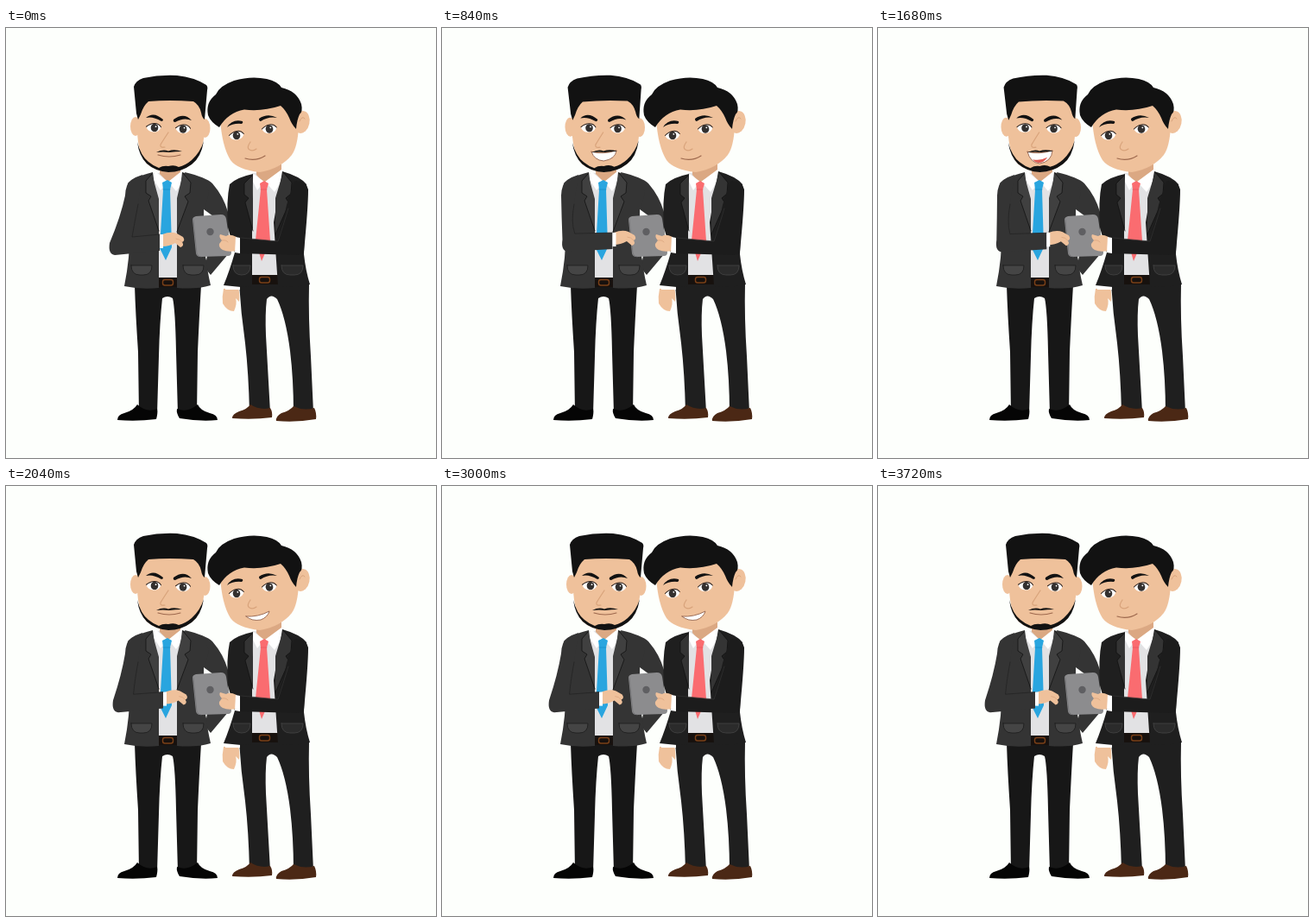
Animation of 498 by 498 pixels, one loop 3.84 s. Source, as an HTML page with a canvas:

```html
<!DOCTYPE html>
<html lang="en">
<head>
<meta charset="utf-8">
<title>Two colleagues with a tablet</title>
<style>
  html, body { margin: 0; width: 100%; height: 100%; overflow: hidden; background: #fdfffc; }
  canvas { display: block; width: 498px; height: 498px; }
</style>
</head>
<body>
<canvas id="stage" width="498" height="498"></canvas>
<script>
const ctx = document.getElementById('stage').getContext('2d');
const STEP = 120, STEPS = 32;
const SKIN = '#efc19b', SHADE = '#d8a37b', HAIR = '#121212', WHITE = '#fdfffc';
const SHIRT = '#e2e2e4', SUIT = '#343434', SUIT_DARK = '#1f1f1f', EDGE = '#171717';

const fill = (color, d) => {
  ctx.fillStyle = color;
  ctx.fill(new Path2D(d));
};

const line = (color, width, d) => {
  ctx.strokeStyle = color;
  ctx.lineWidth = width;
  ctx.lineCap = ctx.lineJoin = 'round';
  ctx.stroke(new Path2D(d));
};

const oval = (color, x, y, rx, ry = rx, turn = 0) => {
  ctx.fillStyle = color;
  ctx.beginPath();
  ctx.ellipse(x, y, rx, ry, turn, 0, Math.PI * 2);
  ctx.fill();
};

const ramp = (t, from, to) => Math.min(1, Math.max(0, (t - from) / (to - from)));

function eye(x, y, tilt, iris) {
  ctx.save();
  ctx.translate(x, y);
  ctx.rotate(tilt);
  ctx.save();
  ctx.clip(new Path2D('M-8.5-1Q-4-5 1-5Q6-5 8.5-1Q7 5 0 5Q-7 5-8.5-1Z'));
  ctx.fillStyle = '#fff';
  ctx.fillRect(-9, -6, 18, 12);
  oval('#33302f', iris, 0, 4.3, 4.7);
  oval('#fff', iris + 1.5, -1.4, 0.9);
  ctx.restore();
  line('#2a1d17', 1, 'M-8.5-1Q-4-5 1-5Q6-5 8.5-1');
  ctx.restore();
}

function belt(x, y, w) {
  fill('#17110e', `M${x} ${y}h${w}v11h${-w}z`);
  ctx.strokeStyle = '#7a4018';
  ctx.lineWidth = 1.4;
  ctx.beginPath();
  ctx.roundRect(x + w / 2 - 6, y + 2.5, 12, 6.5, 2.5);
  ctx.stroke();
}

function flap(x, y, w, color, edge) {
  const d = `M${x} ${y}h${w}q0 11-10 11h${20 - w}q-10 0-10-11z`;
  fill(color, d);
  line(edge, 0.8, d);
}

function leftLegs() {
  fill('#171717', 'M149 298H226Q224 330 222 375L221 447H199L197 375Q196 325 193 313Q187 309 181 313Q178 340 177 380L175 447H154L153 375Q150 330 149 298Z');
  fill('#050505', 'M152 436Q148 443 137 446Q129 448 129 454Q151 456 174 453Q176 446 175 441Q163 446 152 436Z');
  fill('#050505', 'M222 436Q225 443 236 446Q245 448 245 454Q225 456 201 452Q197 446 198 441Q210 446 222 436Z');
}

function leftTorso() {
  fill(SHIRT, 'M171 168H205L201 292H175Z');
  fill('#dba883', 'M178 150H202V168L188 179L178 169Z');
  fill('#fff', 'M173 166L187 178L179 188L169 173ZM203 166L188 178L197 189L208 174Z');
  fill('#29a5df', 'M181 179L187 176L192 179L190 187L192 254L185 269L178 255L182 187Z');
  line('#168dc8', 0.8, 'M182 187L190 187');
  belt(175, 289, 25);

  // Far arm, bent with the hand at the pocket
  fill(SUIT, 'M207 167Q232 173 239 180Q252 195 257 213L258 261L237 286L229 276L232 266L236 240L229 211L217 205Z');
  fill(SUIT, 'M170 167Q147 173 141 180Q137 200 143 236Q144 264 137 299Q156 303 177 301V220Z');
  fill(SUIT, 'M204 167Q230 174 235 190L229 215Q229 265 237 298Q221 303 198 301V225Z');
  fill(WHITE, 'M229 210L240 218L234 258L232 269L230 258Z');
  fill('#404040', 'M169 169L162 177V191L168 195L165 200L177 235V198Z');
  fill('#404040', 'M205 168L214 179L213 191L207 195L211 201L198 236V197Z');
  line(EDGE, 0.9, 'M169 169L162 177V191L168 195L165 200L177 235M205 168L214 179L213 191L207 195L211 201L198 236');
  flap(145, 275, 24, '#454545', '#1c1c1c');
  flap(205, 275, 24, '#454545', '#1c1c1c');
}

function leftArm(dx) {
  const lift = -dx * 0.2, hand = dx * 0.92;
  const ex = 119 + dx, ey = 258 + lift, cx = 178 + dx;
  const top = 239 + lift / 2, inner = 146 + dx * 0.4;
  fill(SUIT, `M158 170Q142 175 140 183Q138 188 138 194Q${133 + dx * 0.28} 218 ${ex + 1} ${ey - 9}Q${ex - 1} ${ey + 4} ${ex + 7} ${ey + 5}L${cx} ${top + 19}V${top}L${inner} ${242 + lift}Q149 222 153 203Z`);
  line('#222', 0.7, `M153 204Q149 225 ${inner} ${242 + lift}L${cx} ${top}`);
  ctx.save();
  ctx.translate(hand, lift / 2 - 1);
  fill(SKIN, 'M181 240Q191 236 198 239L205 243Q208 247 204 249Q207 253 202 255L196 250Q189 254 181 254Z');
  line(SHADE, 0.7, 'M197 245Q201 245 204 249');
  ctx.restore();
  fill('#fff', `M${cx} ${top}h4v16h-4z`);
}

function leftMouth(open) {
  if (!open) {
    line('#9e694e', 1.1, 'M176 147Q189 151 202 147');
    return;
  }
  const low = open === 2 ? 157 : 154;
  const d = `M174 143Q188 147 203 142Q202 ${low - 2} 188 ${low}Q177 ${low - 1} 174 143Z`;
  fill('#fff', d);
  if (open === 2) fill('#df5a52', 'M180 152Q189 154 197 150Q193 156 188 156Q183 156 180 152Z');
  line('#94624c', 0.9, d);
}

function leftHead(tilt, open) {
  ctx.save();
  ctx.translate(187 - tilt * 1.6, 172);
  ctx.rotate(-tilt * 0.078);
  ctx.translate(-187, -172);
  oval(SKIN, 150, 114, 6, 11);
  oval(SKIN, 230.5, 116, 6, 11);
  fill(SKIN, 'M152 80H230L230 118Q229 144 216 157Q204 166 189 167Q173 166 163 157Q153 146 152 120Z');
  fill(HAIR, 'M152 132Q156 148 165 155Q171 160 177 162Q182 159 188 160Q195 158 200 161Q208 159 215 153Q225 144 229 131Q226 150 215 158Q203 167 188 167Q173 166 163 157Q154 148 152 132Z');
  fill(HAIR, 'M148 68Q150 61 159 58Q178 54 198 55Q218 57 232 66Q234 68 233 72L230 106Q227 104 226 98Q224 89 217 85Q189 83 165 85Q159 90 156 100L153 106L151 99Z');
  fill(HAIR, 'M162 104Q171 96 182 106Q182 108 180 108Q170 102 162 104Z');
  fill(HAIR, 'M215 107Q206 97 194 106Q193 109 196 109Q206 103 215 107Z');
  eye(171, 115.5, 0.03, 1);
  eye(205, 117, 0.03, 0);
  line(SHADE, 1.2, 'M188 121Q182 130 179 135Q178 139 184 138');
  leftMouth(open);
  fill(HAIR, 'M174 144Q182 140 188 142.5Q195 140 204 143Q196 143 189 144Q182 143 174 144Z');
  ctx.restore();
}

function tablet() {
  fill('#8c8c8e', 'M220 218L249 216Q254 216 255 221L261 260Q261 264 257 264L225 265Q221 265 220 261L216 222Q216 219 220 218Z');
  line('#737375', 0.8, 'M217 222L221 261Q222 265 226 265');
  oval('#5f5f62', 236.5, 236, 4.2);
}

function rightLegs() {
  fill(SUIT_DARK, 'M270 296H351Q350 335 353 380L356 445H333Q333 407 329 374Q324 335 314 314Q307 307 302 314Q300 330 301 356L306 445H282Q281 400 277 365Q272 330 270 296Z');
  fill('#4b2815', 'M283 436Q280 441 270 444Q262 447 262 452Q286 454 308 451Q309 445 306 440Q294 443 283 436Z');
  fill('#4b2815', 'M333 438Q329 443 319 446Q312 450 313 455Q336 457 359 453Q360 446 357 440Q345 444 333 438Z');
}

function rightTorso() {
  fill(SKIN, 'M252 302Q250 311 251 319Q256 328 264 328Q268 319 266 313L270 317Q271 308 269 301Z');
  fill('#fff', 'M254 297H271V303H254Z');
  fill(SHIRT, 'M285 168H320L314 291H285Z');
  fill('#dba883', 'M290 158H319V165L299 180L290 170Z');
  fill('#fff', 'M287 169L299 178L291 188L284 174ZM319 164L300 178L311 190L323 171Z');
  fill('#fa6c70', 'M294 180L299 177L304 180L302 187L306 247L296 270L289 246L295 187Z');
  line('#e95860', 0.8, 'M295 187L302 187');
  belt(284, 286, 31);
  fill(SUIT_DARK, 'M286 169Q267 173 259 181Q255 200 257 231L265 260Q259 281 252 298L272 300L285 299V225Z');
  fill(SUIT_DARK, 'M320 166Q341 172 348 181Q350 196 346 231L345 262Q347 281 352 297Q334 301 315 299L310 225Z');
  fill('#343434', 'M285 171L276 180V193L281 197L277 202L286 235V198Z');
  fill('#343434', 'M321 167L331 179L330 192L324 197L328 203L312 239V197Z');
  line('#111', 0.8, 'M285 171L276 180V193L281 197L277 202L286 235M321 167L331 179L330 192L324 197L328 203L312 239');
  flap(263, 275, 20, '#2b2b2b', '#444');
  flap(319, 275, 25, '#2b2b2b', '#444');
  fill('#1c1c1c', 'M334 177Q347 176 350 187Q350 207 345 259Q344 263 338 263L270 261V243L314 247Q321 225 325 205Z');
  line('#343434', 0.7, 'M327 209Q321 229 315 247L272 243');
  fill(SKIN, 'M267 242Q259 238 255 241L248 239Q246 242 250 246L247 250Q246 254 251 257Q257 260 267 258Z');
  line(SHADE, 0.7, 'M250 246Q255 245 257 248');
  fill('#fff', 'M266 242L271 243V261L265 260Z');
}

function rightMouth(open) {
  if (!open) {
    line('#9e694e', 1.2, 'M277 151Q289 155 300 148');
    return;
  }
  const wide = open === 2;
  const d = wide
    ? 'M279 150Q292 150 305 141Q306 154 295 158Q284 160 279 150Z'
    : 'M278 151Q292 152 305 145Q303 152 295 155Q285 157 278 151Z';
  fill('#fff', d);
  if (wide) fill('#e24d49', 'M280 153Q293 155 304 148Q302 156 294 158Q285 160 280 153Z');
  line('#94624c', 0.9, d);
}

function rightHead(open) {
  oval(SKIN, 342.5, 109, 9, 13, 0.2);
  line(SHADE, 1, 'M340 108Q343 101 346 105');
  fill(SKIN, 'M248 105Q270 82 327 82L339 113Q338 137 331 147Q318 163 294 167Q268 164 260 153Q250 137 248 105Z');
  fill(HAIR, 'M247 115Q237 109 234 101Q231 86 243 77Q247 67 264 61Q284 55 302 59Q315 62 319 69Q337 73 342 88Q344 97 340 100Q337 106 336 117Q331 112 328 104Q324 95 318 90Q297 97 276 94.5Q257 98 247 115Z');
  fill(HAIR, 'M256 115Q262 105 274 108Q275 110 273 111Q263 110 256 115Z');
  fill(HAIR, 'M314 104Q303 98 293 105Q293 108 295 108Q304 102 314 104Z');
  eye(267, 124.5, -0.12, 0);
  eye(305, 117, -0.12, 0);
  line(SHADE, 1.2, 'M283 132Q278 139 282 141Q286 143 290 140');
  rightMouth(open);
}

function armShift(f) {
  return f < 13 ? 19.5 * ramp(f, 0, 6.5) : 19.5 - 15.5 * ramp(f, 13.5, 17);
}

function draw(now) {
  const f = Math.floor(now / STEP) % STEPS;
  const tilt = ramp(f, 6, 10) - ramp(f, 11, 15);
  const leftOpen = f > 0 && f < 16 ? (f % 4 === 2 ? 2 : 1) : 0;
  const rightOpen = f > 15 && f < 31 ? [0, 1, 2, 1][f % 4] : 0;

  ctx.fillStyle = WHITE;
  ctx.fillRect(0, 0, 498, 498);
  leftLegs();
  rightLegs();
  leftTorso();
  leftHead(tilt, leftOpen);
  tablet();
  leftArm(armShift(f));
  rightTorso();
  rightHead(rightOpen);
}

const start = performance.now();
function tick() {
  draw(performance.now() - start);
  requestAnimationFrame(tick);
}
tick();
</script>
</body>
</html>
```
